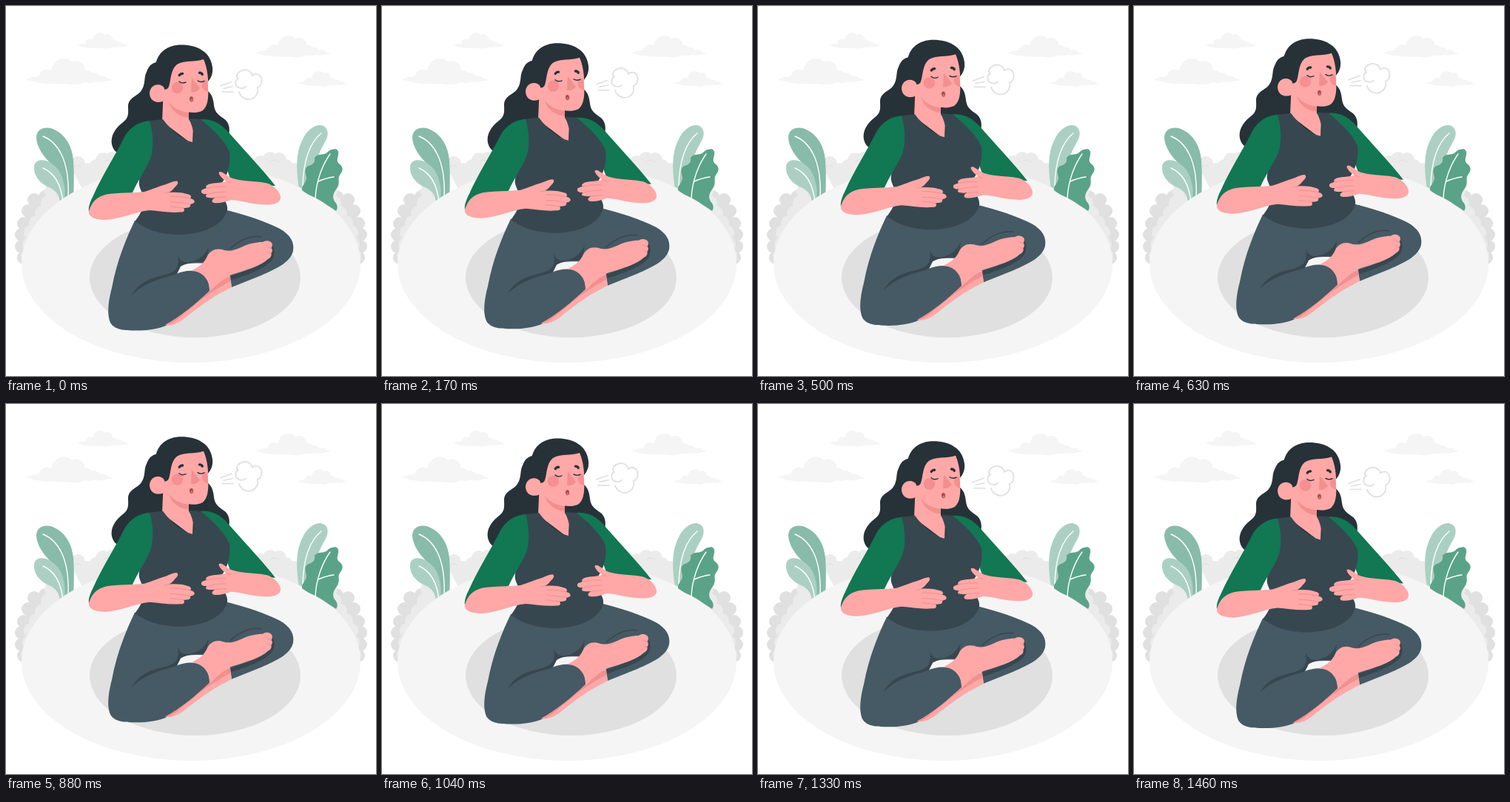
An HTML page with a canvas for the animation above (1500 ms loop, 500 by 500 pixels).

```html
<!DOCTYPE html>
<html lang="en">
<head>
<meta charset="utf-8">
<title>Breathing</title>
<style>
html, body { margin: 0; width: 100%; height: 100%; overflow: hidden; background: #fff; }
canvas { display: block; width: 500px; height: 500px; }
</style>
</head>
<body>
<canvas id="stage"></canvas>
<script>
const canvas = document.getElementById('stage');
const ctx = canvas.getContext('2d');
const ratio = window.devicePixelRatio || 1;
canvas.width = canvas.height = 500 * ratio;

const LOOP = 1500, STEPS = 36, RISE = 10;
const HAIR = '#263238', SKIN = '#ffa8a7', BLUSH = '#f28f8f', TOP = '#37474f',
      PANTS = '#455a64', GREEN = '#127753', MAT = '#e0e0e0', GROUND = '#f5f5f5';

function fill(color, d) {
  ctx.fillStyle = color;
  ctx.fill(new Path2D(d));
}

function line(color, width, d) {
  ctx.strokeStyle = color;
  ctx.lineWidth = width;
  ctx.stroke(new Path2D(d));
}

function oval(color, x, y, rx, ry = rx, turn = 0) {
  ctx.fillStyle = color;
  ctx.beginPath();
  ctx.ellipse(x, y, rx, ry, turn, 0, Math.PI * 2);
  ctx.fill();
}

function cloud(x, y, w, h) {
  ctx.save();
  ctx.translate(x, y);
  ctx.scale(w / 119, h / 35);
  fill('#f5f5f5', `M0 28c4-1 6-4 12-4 4 0 5-1 7-2 1-5 6-8 10-8 3 0 5 1 6 2
    2-10 10-16 17-16 6 0 9 2 11 5 5-3 13-2 16 4 2 4 2 6 2 6 5 0 8 2 9 4
    6-1 9 1 11 4 5-1 10 1 11 4 3 0 5 0 7 1-6 2-10 1-14 3-4 1-9-1-13 0
    -5 2-8 0-12 0-6 3-12 4-20 3-5-1-10 0-14-1-8 1-10-1-17 0
    -6 0-9-2-14-2-4 0-7-3-15-3z`);
  ctx.restore();
}

// Round tufts along a row of centres, closed towards the ground.
function bush(color, r, tufts, base) {
  tufts.forEach(([x, y]) => oval(color, x, y, r));
  fill(color, 'M' + tufts.join('L') + 'L' + base + 'Z');
}

function bushes() {
  bush(MAT, 9, [[24, 340], [21, 325], [21, 309], [24, 294], [30, 277], [38, 262], [53, 258]], [110, 340]);
  bush('#ebebeb', 10, [[30, 338], [32, 322], [34, 306], [41, 293], [49, 280], [57, 266], [62, 250], [66, 242]], [110, 340]);
  bush('#ebebeb', 10, [[88, 218], [97, 213], [110, 222], [122, 217], [131, 208], [143, 207], [156, 212]], [130, 300]);
  line(MAT, 1, 'M91 219C92 215 98 214 101 218M131 211C134 207 141 207 143 211');
}

function scenery() {
  cloud(26, 71, 119, 36);
  cloud(96, 36, 71, 22);
  cloud(337, 40, 102, 30);
  cloud(393, 88, 68, 21);

  bushes();
  ctx.save();
  ctx.translate(500, 0);
  ctx.scale(-1, 1);
  bushes();
  ctx.restore();

  fill('#88bba9', `M41 177C42 166 51 163 60 165C77 170 89 186 91 208C92 225 92 240 91 258
    L78 266C79 246 76 232 66 219C57 209 48 201 44 190C42 185 41 181 41 177Z`);
  fill('#abd0c3', `M38 217C39 209 46 207 54 209C67 214 75 224 78 239C80 248 80 256 79 270
    L73 270C73 257 69 250 58 245C46 240 37 229 38 217Z`);
  line('#fff', 1.4, 'M50 176C70 184 86 208 84 258M50 219C66 226 75 243 77 266');
  fill('#abd0c3', `M397 252C392 225 391 200 400 182C406 168 416 161 425 161
    C434 162 437 171 433 180C428 190 422 198 420 212C417 225 408 238 403 252Z`);
  line('#fff', 1.4, 'M426 172C410 185 402 208 401 243');

  oval(GROUND, 250, 348, 229, 134);
  fill('#5aa389', `M441 194C444 193 447 193 448 195C452 200 445 207 449 212
    C456 217 456 222 452 227C447 233 452 238 448 245C443 252 440 257 444 264
    C448 268 449 273 446 277C438 272 430 266 423 262C415 257 407 255 400 249
    C399 243 406 239 406 232C405 226 402 219 409 216C416 214 418 210 417 205
    C420 199 430 202 434 198C436 196 438 194 441 194Z`);
  line('#fff', 1.4, 'M438 200C428 214 419 236 418 260M422 237C429 234 435 232 443 231');
  oval(MAT, 255.5, 367, 142.5, 81);
}

function legs() {
  fill(GROUND, 'M230 364L233 346L272 344L264 358Z');
  fill(PANTS, `M290 273C325 281 350 290 370 300C384 308 390 318 388 330
    C384 346 365 354 345 363L305 379L302 362L270 347C255 346 245 346 236 350
    L230 361L176 362L176 290L235 300Z`);
  fill(PANTS, `M174 289C163 312 150 342 143 380C139 395 137 410 139 420
    C141 433 150 437 170 437.5C190 438 205 436 218 430C237 419 256 403 275 385
    C276 370 268 358 255 357C246 356 237 358 230 361L225 300Z`);
  fill(TOP, `M232 335C235 344 240 346 248 345C260 343 269 336 274 324
    C273 335 270 341 272 346C258 344 246 345 236 351L231 361
    C216 366 188 371 170 390C178 374 194 367 212 363C229 359 235 354 232 335Z`);
  line(TOP, 1.5, 'M303 327C315 316 330 309 345 311');
  fill(TOP, `M301 365C325 357 343 349 353 338L357 320C363 323 364 333 361 340
    C353 353 330 361 303 370Z`);

  fill(SKIN, `M303 364C290 368 281 378 275 384C257 401 236 419 215 430
    C225 432 235 427 245 418C258 408 275 395 290 387L305 379Z`);
  fill(BLUSH, `M303 364C290 368 281 378 275 384C257 401 236 419 215 430
    C222 430 230 424 238 417C253 405 265 394 278 386C287 380 295 375 303 371Z`);
  fill(SKIN, `M250 357C262 351 268 346 272 337C276 329 284 326 292 328
    C300 331 307 330 318 325C328 320 338 318 347 318C351 315 357 316 359 319
    C361 322 359 326 358 326C361 328 360 332 358 333C360 336 357 340 354 341
    C345 350 325 356 305 362C294 367 285 376 275 385C276 370 266 357 250 357Z`);
  line(BLUSH, 1, 'M353 324Q356 327 359 326M353 331Q356 334 358.5 333');
}

function rightSleeve() {
  fill(GREEN, `M263 152C278 151 290 157 301 170C323 195 346 219 364 242
    L306 240L299 221L285 190L255 160Z`);
}

function torso() {
  fill(SKIN, 'M213 108L211 155L252 186L253 160L247 152L247 138Z');
  fill(BLUSH, 'M220 129C226 137 236 142 247 143L247 150C235 149 224 142 220 129Z');
  fill(TOP, `M194 154L212 152C222 166 238 180 252 183C255 178 255 168 247 151
    L263 152C278 164 295 180 302 196C304 212 300 226 292 238C291 246 291 250 293 255
    C296 263 300 268 299 275C294 294 270 307 235 308C205 308 186 299 174.5 290
    C179 283 186 275 186 262C186 250 178 245 180 235C184 200 192 180 194 154Z`);
}

function arms() {
  fill(GREEN, `M194 154C180 155 168 162 160 176C148 200 130 228 118 255
    C114 263 111 270 112 277L135 262L171 251C176 240 185 225 192 212
    C199 200 201 178 194 154Z`);
  fill(SKIN, `M112 276C116 264 122 257 136 253.5C150 251 172 252 187 250
    C197 247 208 242 216 240C222 238 227 235 231 235.5C234 238 231 241 228 244
    C225 248 222 250 220 251C230 250 240 251 248 254C251 256 250 258 249 259
    C254 260 256 263 254 265C252 267 249 266 249 268C250 271 246 272 240 272
    C242 275 241 278 236 277.5C222 279 208 276 194 275C175 277 155 287 135 288
    C118 288 111 283 112 276Z`);
  line(BLUSH, 1, 'M222 256Q236 256 249 259M222 264Q238 264 249 267M222 270Q232 271 240 272M214 252L221 251');

  fill(SKIN, `M371 257C372 265 362 268 350 267.5C333 267 318 262 304 261
    C296 264 288 266 281 265C277 264 278 260 283 258C276 259 270 258 270 256
    C270 255 271 253 273 253C267 254 263 252 264 249C264 247 268 246 271 245
    C269 243 271 241 275 239.5C282 238 290 238 298 236C293 233 288 228 287.5 224
    C290 221 294 225 299 228C304 232 310 233 318 234.5C330 236 342 236 353 238.5
    C363 242 370 250 371 257Z`);
  line(BLUSH, 1, 'M271 245Q284 242 297 243M273 253Q285 250 297 250M283 258Q291 257 298 257M298 236L304 238');
}

function head() {
  fill(SKIN, `M212 100L222 76L268 69C277 80 273 95 273 108C274 122 273 134 266 140
    C258 145 245 143 238 140C228 136 221 130 218 125L213 128Z`);
  oval('#f58f91', 231.5, 109.5, 7.7);
  fill('#f58f91', 'M271.5 99C263 99 262 113 273 115L273 107Z');
  fill(BLUSH, 'M251 96L262 110C260 114 254 116 250 115Z');

  fill(HAIR, `M202 80C204 62 218 51.5 237 51.5C258 51.5 277 61 279 82C280 90 277 97 273 101
    C273 92 271 80 267 71C255 75 240 72 231 78C222 85 223 100 220 108
    C219 112 213 113 212 110C210 106 207 106 203 108L190 110Z`);
  fill(SKIN, 'M214 110C210 103 196 103 194 116C194 127 203 132 214 127Z');

  line(HAIR, 3.4, 'M234.3 92.6Q236 90.2 238.5 90.4M261.5 89.2Q264.5 89.4 265.3 91.4');
  line(HAIR, 1.4, 'M234 101Q238 104.5 243 102M259 100Q263 102.8 268 100.3');
  oval('#a24e4f', 250.6, 124.8, 2.5, 3.6, -0.15);
  oval('#dc7474', 251, 126.2, 1.5, 1.6);
}

function breath() {
  line(MAT, 1.8, `M315 115C317 123 326 127 333 124C339 121 341 115 340 109
    C346 107 347 99 344 94C341 90 336 90 333 93C331 86 323 83 317 87
    C311 90 311 95 314 97C309 99 309 107 314 109C318 111 322 110 324 108`);
  line(MAT, 1.6, 'M290 107L305 101.5M294 110.5L306 108M292 115L307 115');
}

function figure() {
  fill(HAIR, `M203 75C196 77 193 80 190 88C186 95 189 104 183 113
    C178 121 166 122 165 134C165 143 167 150 157 157C147 165 141 175 143 186
    C144 191 147 195 150 197L200 210L301 175C303 165 302 156 294 151
    C285 145 282 141 281 133C280 125 279 119 272 113L265 85L205 72Z`);
  legs();
  rightSleeve();
  torso();
  arms();
  head();
  breath();
}

function draw(now) {
  const step = Math.floor((now % LOOP) / LOOP * STEPS + 0.1) % STEPS;
  const lift = RISE * (1 - Math.abs(1 - 2 * step / STEPS));
  ctx.setTransform(ratio, 0, 0, ratio, 0, 0);
  ctx.fillStyle = '#fff';
  ctx.fillRect(0, 0, 500, 500);
  ctx.lineCap = ctx.lineJoin = 'round';
  scenery();
  ctx.translate(0, 1 - lift);
  figure();
}

const start = performance.now();
function tick() {
  draw(performance.now() - start);
  requestAnimationFrame(tick);
}
tick();
</script>
</body>
</html>
```
